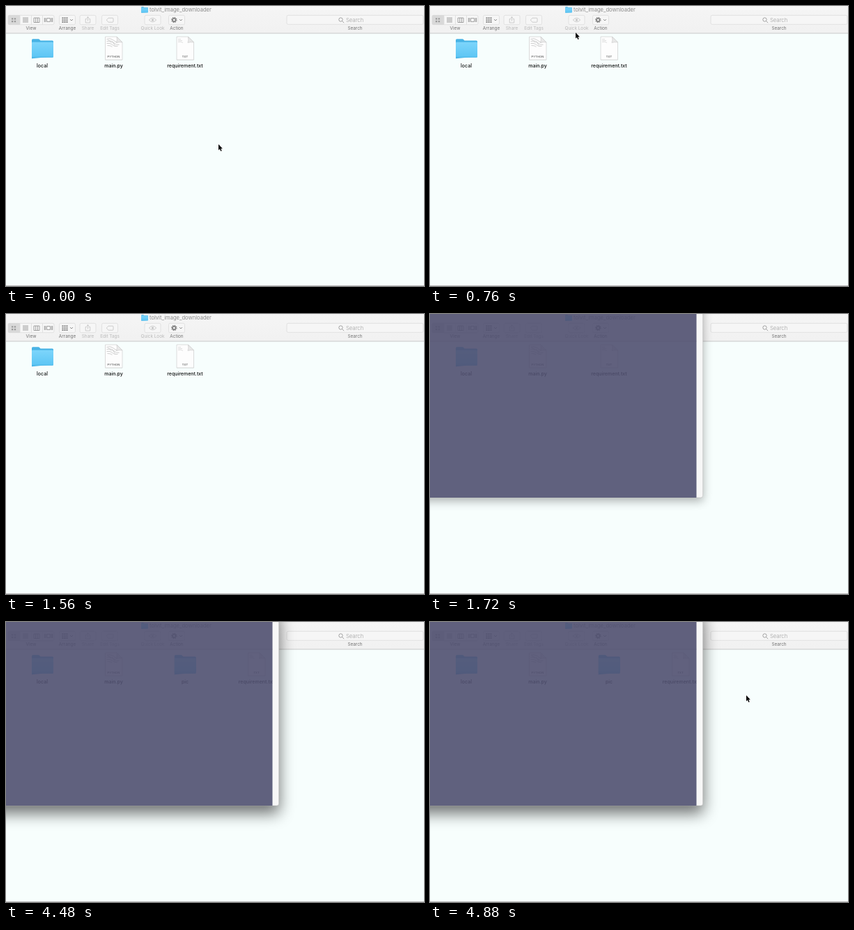
Animation, 600 px wide and 401 px high, one loop 5040 ms. Source, as an HTML page:

```html
<!DOCTYPE html>
<html lang="en">
<head>
<meta charset="utf-8">
<title>Folder window</title>
<style>
  html, body { margin: 0; width: 100%; height: 100%; overflow: hidden; background: #f7fefd; }
  svg { display: block; width: 100%; height: 100%; }
  text { font-family: Inter, Roboto, "Liberation Sans", sans-serif; text-anchor: middle; }
  .tool { font-size: 6.4px; fill: #737373; }
  .tool.off { fill: #b9b9b9; }
  .name { font-size: 7px; font-weight: 500; fill: #111; }
  .kind { font-size: 4px; font-weight: 500; fill: #555; letter-spacing: .15px; }
  .title { font-size: 7.6px; fill: #8c8c8c; text-anchor: start; }
  .hint { font-size: 7.6px; fill: #b2b2b2; text-anchor: start; }
  .btn { fill: #f6f6f6; stroke: #dcdcdc; stroke-width: .8; }
  .ico { fill: none; stroke: #8e8e8e; stroke-width: .8; }
  .ico.off { stroke: #c2c2c2; }
</style>
</head>
<body>
<svg viewBox="0 0 600 401" preserveAspectRatio="none">
  <defs>
    <linearGradient id="blue" x2="0" y2="1">
      <stop offset="0" stop-color="#7dd5fb"/><stop offset="1" stop-color="#5cc5f4"/>
    </linearGradient>
    <linearGradient id="bar" x2="0" y2="1">
      <stop offset="0" stop-color="#f5f5f5"/><stop offset="1" stop-color="#f1f1f1"/>
    </linearGradient>
    <g id="folder">
      <path d="M-15.5 15V-11.5q0-1.5 1.500-1.500h8q1 0 1.800 1l1.200 1.300H14q1.500 0 1.500 1.500V12z" fill="#48b3e5"/>
      <rect x="-15.500" y="-8.500" width="31" height="22" rx="1.300" fill="url(#blue)"/>
      <path d="M-15 12.800H15" stroke="#4db5e4" stroke-width=".7"/>
    </g>
    <g id="sheet">
      <path d="M-12-16.500H4.500L12.500-8.500V16.500H-12z" fill="#000" opacity=".08" transform="translate(0 .8)"/>
      <path d="M-12-16.500H4.500L12.500-8.500V16.500H-12z" fill="#fdfdfd" stroke="#cfcfcf" stroke-width=".7"/>
      <path d="M4.500-16.500q1 5-.5 8.500 4-1.300 8.500-.5z" fill="#e9e9e9" stroke="#c6c6c6" stroke-width=".6"/>
    </g>
    <path id="chevron" d="M-2-1L0 1L2-1" fill="none" stroke="#858585" stroke-width=".9"/>
    <filter id="soft"><feGaussianBlur stdDeviation=".5"/></filter>
    <filter id="shade" x="-20%" y="-30%" width="140%" height="160%">
      <feGaussianBlur id="spread" stdDeviation="11"/>
    </filter>
    <clipPath id="pane"><rect width="382.500" height="263"/></clipPath>
  </defs>

  <g id="finder">
    <rect width="600" height="401" fill="#f7fefd"/>
    <rect width="600" height="39" fill="url(#bar)"/>
    <rect y="38.600" width="600" height=".9" fill="#c4c4c4"/>
    <rect y="400" width="600" height="1" fill="#bcbcbc"/>

    <use href="#folder" transform="translate(199 5.200) scale(.31)"/>
    <text class="title" x="206" y="8">tolvit_image_downloader</text>

    <rect class="btn" x="3" y="13.300" width="66" height="13.400" rx="2"/>
    <path d="M20 13H5q-2 0-2 2v10q0 2 2 2h15z" fill="#d9d9d9"/>
    <path d="M20 13.500v13M36.500 13.500v13M52.500 13.500v13" stroke="#dcdcdc" stroke-width=".8"/>
    <path d="M8 17.200h2.300v2.300H8zM11.800 17.200h2.300v2.300h-2.300zM8 21h2.300v2.300H8zM11.800 21h2.300v2.300h-2.300z" fill="#9b9b9b"/>
    <path class="ico" d="M24 17h8M24 19h8M24 21h8M24 23h8"/>
    <path class="ico" d="M40 17h8v6.500h-8zM42.700 17v6.500M45.400 17v6.500"/>
    <path class="ico" d="M58.500 17.500h5v5h-5zM56.700 17v6M55.300 17v6M65.300 17v6M66.700 17v6"/>

    <g id="buttons"></g>
    <path d="M80.500 17.300h8M80.500 20.200h8M80.500 23.100h8" stroke="#858585" stroke-width="2" stroke-dasharray="2 1"/>
    <use href="#chevron" x="94" y="20"/>
    <path class="ico off" d="M116 18.500h-1.800v5.500h6.500v-5.500h-1.800M117.500 21.500v-6M115.700 17.200l1.800-1.800 1.800 1.800"/>
    <path class="ico off" d="M147 17.200h6q1 0 1 1v4q0 1-1 1h-6l-2.300-2.300v-1.400z"/>
    <path class="ico off" d="M205.300 20q5.200-5.600 10.400 0q-5.200 5.600-10.400 0z"/>
    <circle cx="210.500" cy="20" r="1.600" fill="#c2c2c2"/>
    <circle cx="241.300" cy="20" r="2.300" fill="none" stroke="#808080" stroke-width="1.700"/>
    <circle cx="241.300" cy="20" r="3.700" fill="none" stroke="#808080" stroke-width="1.100" stroke-dasharray="1.450 1.456"/>
    <use href="#chevron" x="251" y="20"/>

    <rect class="btn" x="403" y="13.300" width="196" height="13" rx="2"/>
    <circle class="ico" cx="480.500" cy="19.500" r="2.700"/>
    <path class="ico" d="M482.500 21.500l2.700 2.700"/>
    <text class="hint" x="488" y="22.800">Search</text>
    <g id="captions"></g>

    <use href="#folder" x="52.500" y="60.300"/>
    <text class="name" x="52" y="87.700">local</text>

    <g transform="translate(154.500 60.500)">
      <use href="#sheet"/>
      <path d="M-10-13q5-2 9 1t6 4M-10-10q6-2 10 2t8 3M-10-7q5-1 8 2t8 2M-9-4q5 0 7 2M-8-12l5 4M-2-10l4 6" fill="none" stroke="#c4c4c4" stroke-width=".8"/>
      <text class="kind" y="13.300">PYTHON</text>
      <text class="name" y="27.200">main.py</text>
    </g>

    <g id="pic">
      <use href="#folder" x="257.300" y="60.300"/>
      <text class="name" x="257" y="87.700">pic</text>
    </g>

    <g id="note">
      <use href="#sheet"/>
      <path d="M-10-13h4M-10-11h6M-10-9q4-1 7 1" fill="none" stroke="#d2d2d2" stroke-width=".7"/>
      <text class="kind" y="13.300">TXT</text>
      <text class="name" y="27.200">requirement.txt</text>
    </g>
  </g>

  <g id="terminal">
    <rect id="shadow" x="-40" y="-20" width="432" height="283" filter="url(#shade)"/>
    <path d="M-5-20H391.700V260q0 3-3 3H-5z" fill="#f7f7f7" stroke="#b5b5b5" stroke-width=".5"/>
    <g clip-path="url(#pane)">
      <use href="#finder" filter="url(#soft)"/>
      <rect width="383" height="263" fill="#505071" fill-opacity=".9"/>
    </g>
  </g>

  <path id="cursor" d="M0 0V8.400L1.900 6.700L3.300 9.900L4.700 9.300L3.300 6.200H5.900z" fill="#000" stroke="#fff" stroke-width=".7" paint-order="stroke"/>
</svg>

<script>
const LOOP = 5040, TICK = 40;
const $ = id => document.getElementById(id);

// label, centre, has a button, is disabled
const tools = [
  ["View", 36, false, false],
  ["Arrange", 88, true, false],
  ["Share", 117.5, true, true],
  ["Edit Tags", 149, true, true],
  ["Quick Look", 210.5, true, true],
  ["Action", 245, true, false],
  ["Search", 501, false, false]
];
for (const [label, x, button, off] of tools) {
  $("captions").innerHTML += `<text class="tool${off ? " off" : ""}" x="${x}" y="34.2">${label}</text>`;
  if (button) $("buttons").innerHTML +=
    `<rect class="btn" x="${x - 11.5}" y="13.3" width="23" height="13.4" rx="2"/>`;
}

const easeIn = p => p ** 1.4;
const easeOut = p => 1 - (1 - p) ** 2;
const easeBoth = p => p * p * (3 - 2 * p);

// pointer strokes: start, end, from, to, easing
const strokes = [
  [480, 760, [305, 198], [209, 38], easeBoth],
  [880, 1400, [209, 38], [193, -14], easeIn],
  [4520, 4880, [400, 4], [454, 105], easeOut]
];

function pointerAt(t) {
  let stroke = strokes[0];
  for (const s of strokes) if (t >= s[0]) stroke = s;
  const [start, end, from, to, ease] = stroke;
  const p = ease(Math.min(1, Math.max(0, (t - start) / (end - start))));
  return from.map((v, i) => v + (to[i] - v) * p);
}

const show = (id, on) => $(id).setAttribute("visibility", on ? "visible" : "hidden");

function draw(time) {
  const t = Math.floor((time % LOOP) / TICK) * TICK;
  const active = t >= 1800, saved = t >= 4480;

  show("terminal", t >= 1720);
  $("spread").setAttribute("stdDeviation", active ? 11 : 7);
  $("shadow").setAttribute("transform", `translate(0 ${active ? 11 : 5})`);
  $("shadow").setAttribute("opacity", active ? .56 : .3);

  $("pic").style.display = saved ? "" : "none";
  $("note").setAttribute("transform", `translate(${saved ? 359.5 : 257} 60.5)`);

  show("cursor", t < 1400 || t >= 4560);
  $("cursor").setAttribute("transform", `translate(${pointerAt(t)})`);
}

const begin = performance.now();
function loop() {
  draw(performance.now() - begin);
  requestAnimationFrame(loop);
}
loop();
</script>
</body>
</html>
```
